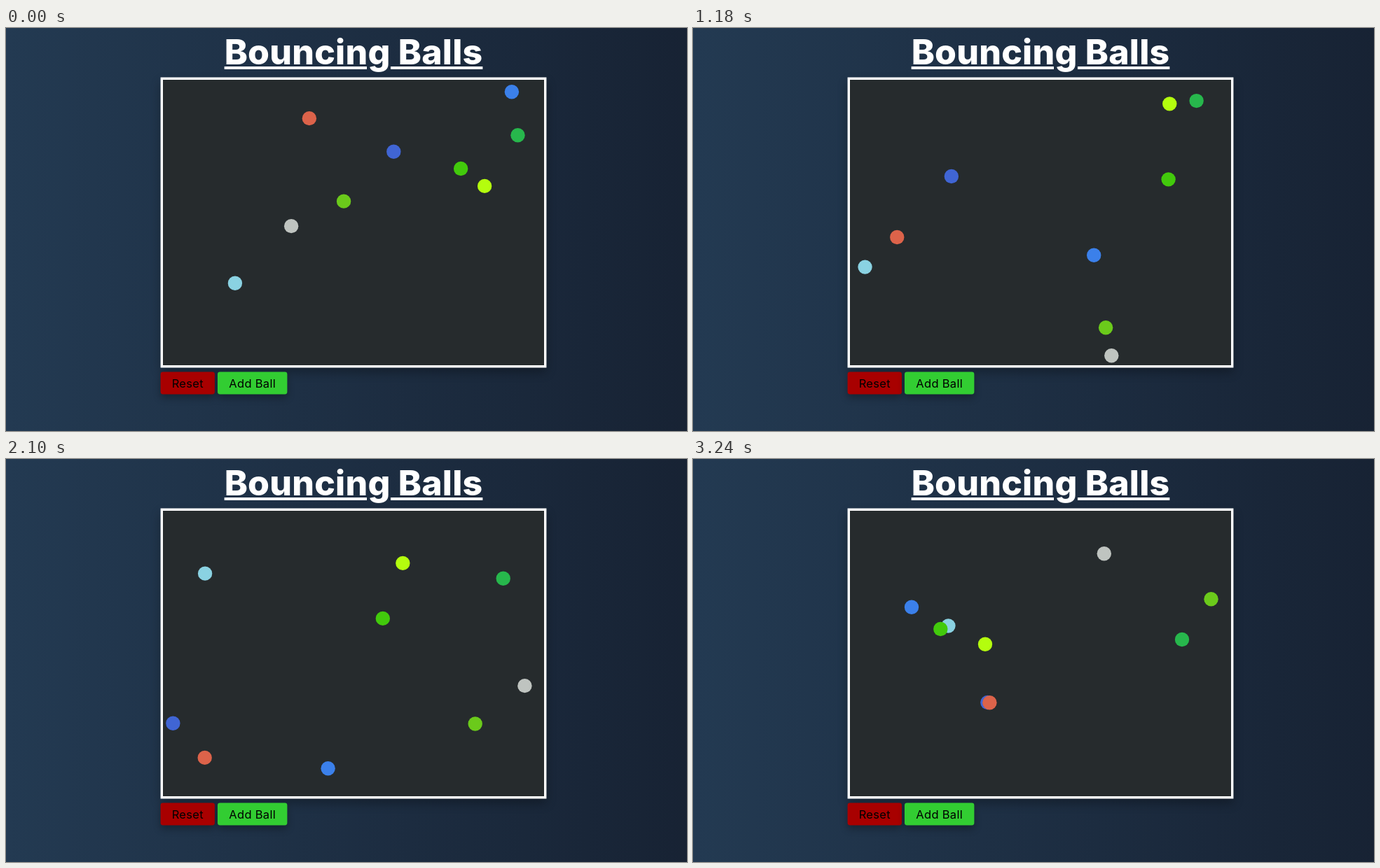
Animation of 972 by 576 pixels, one loop 3.27 s. Source, as an HTML page with a canvas:

```html
<!DOCTYPE html>
<html lang="en">
<head>
<meta charset="utf-8">
<title>Bouncing Balls</title>
<style>
html, body { margin: 0; width: 100%; height: 100%; overflow: hidden; }
body {
  position: relative;
  background: linear-gradient(to right, #233a52, #172233 992px);
  font-family: Inter, "Open Sans", sans-serif;
}
canvas, h1, .label { position: absolute; margin: 0; white-space: nowrap; text-align: center; }
canvas { left: 0; top: 0; }
h1 {
  left: 196px; top: 4px; width: 600px;
  font-size: 50px; line-height: 60px; font-weight: 800;
  letter-spacing: .2px; color: #fff;
  text-decoration: underline 4px; text-underline-offset: 3px;
}
.label { top: 491.5px; font-size: 16.5px; line-height: 32px; letter-spacing: .3px; color: #000; }
.reset { left: 220.6px; width: 77.4px; }
.add { left: 302px; width: 99.4px; }
</style>
</head>
<body>
<canvas id="stage" width="972" height="576"></canvas>
<h1>Bouncing Balls</h1>
<div class="label reset">Reset</div>
<div class="label add">Add Ball</div>
<script>
const ctx = document.getElementById('stage').getContext('2d');
const LOOP = 3270, LAST = 3240, STEPS = 100;
const BOX = { x: 224, y: 74, w: 544, h: 408 }, BORDER = 3.4, RADIUS = 10.2;
const WALLS_X = [234.2, 757.4], WALLS_Y = [84.4, 471.4];

const balls = [
  { color: '#8ad2e2', x: 327, y: 364.5, dx: -2.23, dy: 6.48 },
  { color: '#4065d4', x: 553.5, y: 177, dx: -5.055, dy: -6.03 },
  { color: '#3b80ea', x: 722, y: 91, dx: -4.1, dy: 6.4 },
  { color: '#bfc4c0', x: 407, y: 283, dx: 5.21, dy: 5.245 },
  { color: '#6bca1b', x: 482, y: 247.5, dx: 2.933, dy: 4.95 },
  { color: '#27b74c', x: 730.5, y: 153.3, dx: -0.325, dy: -2.425 },
  { color: '#b4fd0e', x: 683, y: 226, dx: 4.148, dy: -3.22 },
  { color: '#42ca0c', x: 649, y: 201, dx: 5.125, dy: 0.42 },
  { color: '#dc634a', x: 433, y: 129, dx: -3.88, dy: 4.655 }
];

// the simulation lags briefly in the middle of the loop
const pace = [[0, 0], [1180, 36.5], [1690, 51], [LAST, STEPS]];

function stepsAt(t) {
  const i = pace.findIndex(([end]) => end > 0 && t <= end);
  if (i < 0) return STEPS;
  const [t0, s0] = pace[i - 1], [t1, s1] = pace[i];
  return s0 + (s1 - s0) * (t - t0) / (t1 - t0);
}

// reflect a straight path between two walls
function bounce(v, [lo, hi]) {
  const span = hi - lo, lap = 2 * span;
  const m = (((v - lo) % lap) + lap) % lap;
  return lo + Math.min(m, lap - m);
}

function panel(color, x, y, w, h, r, blur, drop) {
  ctx.save();
  ctx.shadowColor = 'rgba(0, 0, 0, .3)';
  ctx.shadowBlur = blur;
  ctx.shadowOffsetY = drop;
  ctx.fillStyle = color;
  ctx.beginPath();
  ctx.roundRect(x, y, w, h, r);
  ctx.fill();
  ctx.restore();
}

function draw(t) {
  const s = stepsAt(t), { x, y, w, h } = BOX;
  ctx.clearRect(0, 0, 972, 576);
  panel('#fff', x - BORDER, y - BORDER, w + 2 * BORDER, h + 2 * BORDER, 0, 14, 7);
  panel('#a80000', 220.6, 491.5, 77.4, 32, 3.4, 11, 5);
  panel('#32cd32', 302, 491.5, 99.4, 32, 3.4, 11, 5);
  ctx.fillStyle = '#262b2d';
  ctx.fillRect(x, y, w, h);
  for (const b of balls) {
    ctx.fillStyle = b.color;
    ctx.beginPath();
    ctx.arc(bounce(b.x + b.dx * s, WALLS_X), bounce(b.y + b.dy * s, WALLS_Y), RADIUS, 0, Math.PI * 2);
    ctx.fill();
  }
}

const start = performance.now();
function loop() {
  draw((performance.now() - start) % LOOP);
  requestAnimationFrame(loop);
}
loop();
</script>
</body>
</html>
```
